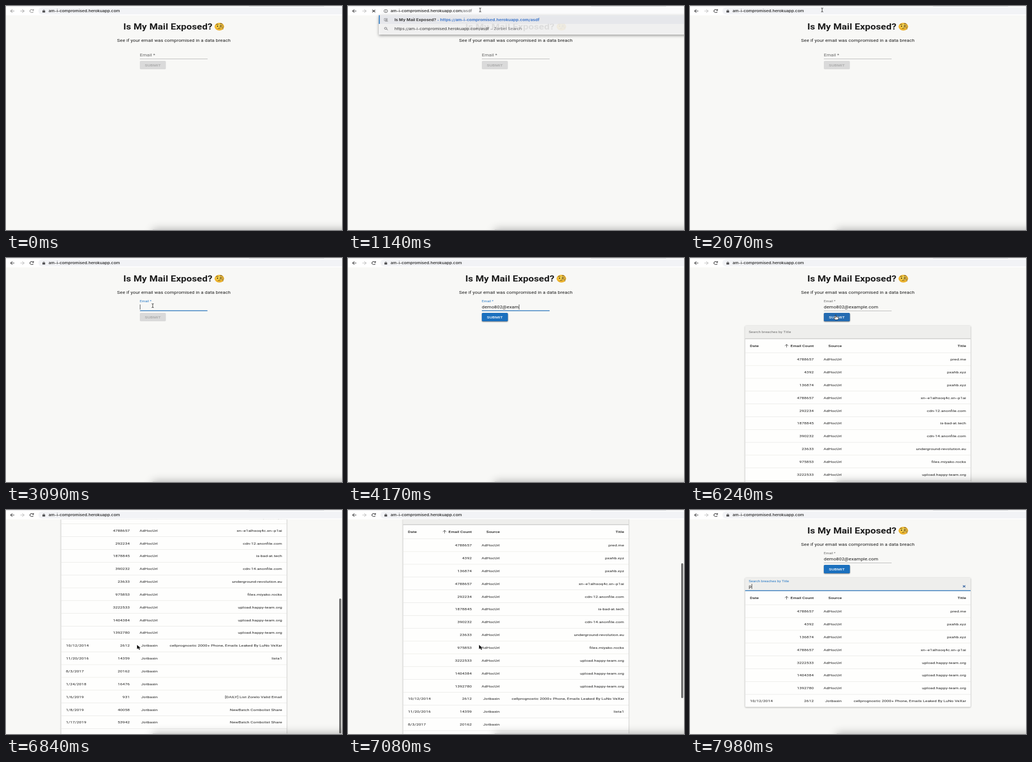
These frames come from a looping animation (600x400 px, 8000 ms). An HTML page with a canvas:

```html
<!DOCTYPE html>
<html lang="en">
<head>
<meta charset="utf-8">
<title>Breach check</title>
<style>
html, body { margin: 0; width: 100%; height: 100%; overflow: hidden; background: #f8f8f6; }
canvas { display: block; width: 600px; height: 400px; }
</style>
</head>
<body>
<canvas id="stage"></canvas>
<script>
const LOOP = 8000, W = 600, H = 400;
// The page is shown squashed: one page pixel is SX by SY on the stage.
const SX = 0.536, SY = 0.43;
const UI = 'Roboto, sans-serif', BAR = 'Inter, sans-serif';
const INK = '#1c1c1c', BLUE = '#1f74c4', PAGE = '#f8f8f6', PAPER = '#fefefd', LINE = '#e6e6e2';
const HOST = 'am-i-compromised.herokuapp.com', PATH = '/asdf';
const NAME = 'Is My Mail Exposed?', EMAIL = 'demo802@example.com';
const ROW = 22.85, TOP = 16.5;

const adHoc = (count, title) => ['', count, 'AdHocUrl', title];
const paste = (date, count, title) => [date, count, 'Jotbasin', title];
const ROWS = [
  adHoc('4788657', 'pred.me'),
  adHoc('4392', 'pxahb.xyz'),
  adHoc('136874', 'pxahb.xyz'),
  adHoc('4788657', 'xn--e1alhsoq4c.xn--p1ai'),
  adHoc('292234', 'cdn-12.anonfile.com'),
  adHoc('1878845', 'is-bad-at.tech'),
  adHoc('390232', 'cdn-14.anonfile.com'),
  adHoc('23633', 'underground-revolution.eu'),
  adHoc('975853', 'files.miyako.rocks'),
  adHoc('3222533', 'upload.happy-team.org'),
  adHoc('1404384', 'upload.happy-team.org'),
  adHoc('1392780', 'upload.happy-team.org'),
  paste('10/12/2014', '2612', 'cellprognostic 2000+ Phone, Emails Leaked By LuNo VeXar'),
  paste('11/20/2016', '14359', 'lista1'),
  paste('8/3/2017', '20162', ''),
  paste('1/24/2018', '16476', ''),
  paste('1/6/2019', '931', '[DAILY] List Zorelo Valid Email'),
  paste('1/8/2019', '40058', 'NewBatch Combolist Share'),
  paste('1/17/2019', '53942', 'NewBatch Combolist Share'),
  paste('2/3/2019', '15208', 'NewBatch Combolist Share')
];

const AT = {
  focus: 300, openList: 560, enter: 1100, loaded: 1600, home: 1650,
  email: 2900, type: 3260, select: 5200, submit: 5800, table: 6040,
  search: 7520, letter: 7890, filter: 7950
};
const MOUSE = [
  [60, 300, 0], [280, 236, 7], [2070, 236, 7], [2250, 241, 38],
  [2430, 241, 38], [2860, 262, 85], [5380, 262, 85], [5720, 261, 106],
  [6290, 261, 106], [6480, 235, 244], [7290, 235, 244], [7480, 180, 133]
];
const SCROLL = [[6490, 0], [6840, 213], [6900, 213], [7290, 0]];

const cv = document.getElementById('stage'), c = cv.getContext('2d');
const dpr = window.devicePixelRatio || 1;
cv.width = W * dpr;
cv.height = H * dpr;

const clamp = v => Math.max(0, Math.min(1, v));
const ease = v => v * v * (3 - 2 * v);
const ramp = (t, start, dur) => ease(clamp((t - start) / dur));
const mix = (a, b, k) => a + (b - a) * k;
const blink = (t, start) => (t - start) % 1060 < 530;

function follow(keys, t) {
  const n = keys.findIndex(k => k[0] > t);
  if (n < 0) return keys[keys.length - 1].slice(1);
  if (n === 0) return keys[0].slice(1);
  const a = keys[n - 1], b = keys[n], k = ease((t - a[0]) / (b[0] - a[0]));
  return a.slice(1).map((v, i) => mix(v, b[i + 1], k));
}

function box(x, y, w, h, color) {
  c.fillStyle = color;
  c.fillRect(x, y, w, h);
}

function rounded(x, y, w, h, r, color) {
  c.fillStyle = color;
  c.beginPath();
  c.roundRect(x, y, w, h, r);
  c.fill();
}

// Draws text vertically centred on its capitals; returns its stage width.
function text(str, x, y, o = {}) {
  const { size = 14, weight = 400, font = UI, color = INK, align = 'left' } = o;
  c.save();
  c.translate(x, y + size * 0.153);
  c.scale(SX, SY);
  c.font = `${weight} ${size}px ${font}`;
  c.letterSpacing = (o.spacing ?? (font === UI ? 0.15 : 0)) + 'px';
  c.textAlign = align;
  c.fillStyle = color;
  c.fillText(str, 0, 0);
  const w = c.measureText(str).width * SX;
  c.restore();
  return w;
}

// Runs a drawing in page pixels around a stage point.
function icon(x, y, color, width, draw) {
  c.save();
  c.translate(x, y);
  c.scale(SX, SY);
  c.strokeStyle = c.fillStyle = color;
  c.lineWidth = width;
  c.lineJoin = 'round';
  draw();
  c.restore();
}

function path(...pts) {
  c.beginPath();
  for (let i = 0; i < pts.length; i += 2) c.lineTo(pts[i], pts[i + 1]);
}
function stroke(...pts) { path(...pts); c.stroke(); }
function fill(...pts) { path(...pts); c.fill(); }
function ring(x, y, r, a = 0, b = 7) { c.beginPath(); c.arc(x, y, r, a, b); c.stroke(); }
function disc(x, y, rx, ry = rx) { c.beginPath(); c.ellipse(x, y, rx, ry, 0, 0, 7); c.fill(); }

function arrow(x, y, dir, color) {
  icon(x, y, color, 1.9, () => {
    stroke(-6.5 * dir, 0, 6.5 * dir, 0);
    stroke(0, -6.5, 6.5 * dir, 0, 0, 6.5);
  });
}

function cross(r) {
  stroke(-r, -r, r, r);
  stroke(-r, r, r, -r);
}

function toolbar(t) {
  const active = t >= AT.focus, dark = active ? '#2a2a2c' : '#8c8c8c';
  const editing = t >= AT.openList && t < AT.home;
  box(0, 0, W, TOP, '#fff');
  box(0, 0, W, 1, '#e4e4e6');
  box(434, 0, 134, 1, '#cbccd0');
  rounded(58, 2.5, 560, 12.5, 6, editing ? '#fbfbfc' : '#f2f3f6');
  arrow(11.5, 9, -1, dark);
  arrow(29, 9, 1, active ? '#b8b8b8' : '#a0a0a0');

  icon(46, 9, dark, 1.9, () => {
    if (t >= AT.enter && t < AT.loaded) {
      cross(5);
    } else {
      ring(0, 0, 6, 0.5, 5.6);
      fill(7, -8, 7, -1.5, 0.5, -1.5);
    }
  });

  icon(67.5, 9, '#48484a', 1.6, () => {
    if (editing) {
      ring(0, 0, 6.2);
      stroke(0, -0.8, 0, 3.6);
      c.fillRect(-0.9, -3.8, 1.8, 1.8);
    } else {
      c.fillRect(-4.5, -1.5, 9, 7.5);
      ring(0, -2, 2.8, Math.PI, 2 * Math.PI);
    }
  });

  if (t >= 360 && t < 530) box(76, 4, 127, 10, '#b5d3f5');
  const w = text(HOST, 76, 9, { font: BAR, weight: 500 });
  if (editing) {
    const n = Math.min(PATH.length, 1 + Math.floor((t - AT.openList) / 95));
    const v = text(PATH.slice(0, n), 76 + w, 9, { font: BAR, color: '#58585a' });
    if (t < AT.enter && blink(t, AT.openList)) box(76.5 + w + v, 4.5, 0.6, 9, INK);
  }
}

function suggestions(t) {
  if (t < AT.openList) return;
  const alpha = 1 - clamp((t - AT.enter) / 280);
  if (!alpha) return;
  const url = 'https://' + HOST + PATH;
  c.save();
  c.globalAlpha = alpha;
  c.shadowColor = 'rgba(0,0,0,.45)';
  c.shadowBlur = 5 * dpr;
  c.shadowOffsetY = 1.5 * dpr;
  box(55, TOP, 560, 34.5, '#fff');
  c.shadowColor = 'transparent';
  box(55, TOP, 560, 15.5, '#e5e6ea');
  box(55, TOP, 1.8, 15.5, BLUE);
  icon(68, 24.5, '#707074', 1.5, () => {
    c.strokeRect(-6, -5, 10, 9);
    stroke(-3, 6.5, 6.5, 6.5);
    disc(0, 0, 2.4);
  });
  const bold = { font: BAR, weight: 700 };
  const w = text(NAME + ' ', 83, 24.5, bold);
  text('- ' + url, 83 + w, 24.5, { ...bold, color: '#2263c4' });
  icon(68, 40.5, '#58585c', 1.8, () => { ring(-1.5, -1.5, 4); stroke(1.5, 1.5, 6, 6); });
  const v = text(url, 83, 40.5, { font: BAR, color: '#111' });
  text(' – Zorbel Search', 83 + v, 40.5, { font: BAR, color: '#5c5c60' });
  c.restore();
}

function face(x, y) {
  icon(x, y, '#f4c52e', 1.8, () => {
    const g = c.createRadialGradient(-2, -5, 2, 0, 0, 17);
    g.addColorStop(0, '#ffe45c');
    g.addColorStop(1, '#e9a61e');
    c.fillStyle = g;
    disc(0, 0, 16);
    c.strokeStyle = c.fillStyle = '#4a3010';
    disc(-6, -2, 2, 2.8);
    disc(5, -2, 2, 2.8);
    ring(-7, -5, 5, 3.8, 5.8);
    ring(6, -8, 5, 3.6, 5.8);
    ring(-1, 12, 5, 3.9, 5.5);
    c.strokeStyle = '#8b7a50';
    ring(6, -1, 6);
    stroke(12, 1, 12, 12);
  });
}

function emailField(t) {
  const up = ramp(t, AT.email, 200);
  const focused = t >= AT.email && t < AT.submit;
  text('Email *', 239, mix(87.5, 76.8, up), {
    size: mix(16, 12, up), color: focused ? BLUE : '#666'
  });
  box(239, 94, 121, 0.6, '#9c9c9c');
  if (focused) {
    const w = 121 * up;
    box(299.5 - w / 2, 93.5, w, 1.2, BLUE);
  }
  const n = clamp((t - AT.type) / 1480) * EMAIL.length;
  const shown = t < AT.type ? '' : EMAIL.slice(0, Math.floor(n) + 1);
  const selected = t >= AT.select && t < AT.submit;
  if (selected) box(239, 82.5, 89, 9.5, '#b4d2ee');
  const w = text(shown, 239, 87.3, { size: 16 });
  if (focused && !selected && blink(t, AT.email)) box(239.2 + w, 83, 0.7, 9, INK);
}

function button(t) {
  const on = clamp((t - AT.type) / 200), hover = t >= 5640 && t < 6330;
  const label = { weight: 500, spacing: 0.4, align: 'center' };
  rounded(239, 98, 46.5, 15, 1.8, '#dadada');
  text('SUBMIT', 262.3, 105.6, { ...label, color: '#a6a6a6' });
  if (!on) return;
  c.save();
  c.globalAlpha = on;
  c.shadowColor = 'rgba(0,0,0,.5)';
  c.shadowBlur = 2 * dpr;
  c.shadowOffsetY = dpr;
  rounded(239, 98, 46.5, 15, 1.8, hover ? '#1662ac' : '#1b70be');
  c.shadowColor = 'transparent';
  const k = clamp((t - AT.submit) / 550);
  if (k > 0 && k < 1) {
    c.save();
    c.clip();
    c.fillStyle = `rgba(255,255,255,${0.3 * (1 - k)})`;
    disc(261, 106, 30 * ease(k), 24 * ease(k));
    c.restore();
  }
  text('SUBMIT', 262.3, 105.6, { ...label, color: '#fff' });
  c.restore();
}

function table(t) {
  if (t < AT.table) return;
  const rows = t < AT.filter ? ROWS : ROWS.filter(r => r[3].includes('p'));
  const focused = t >= AT.search, up = ramp(t, AT.search, 200);
  c.save();
  c.shadowColor = 'rgba(0,0,0,.4)';
  c.shadowBlur = 2.5 * dpr;
  c.shadowOffsetY = 0.8 * dpr;
  rounded(98.5, 121, 402.5, 48 + ROW * rows.length, 1.5, PAPER);
  c.restore();

  rounded(98.5, 121, 402.5, 23.3, [1.5, 1.5, 0, 0], '#eeeeec');
  box(98.5, 143.8, 402.5, 0.6, '#949494');
  if (focused) {
    const w = 402.5 * up;
    box(299.75 - w / 2, 143.4, w, 1.2, BLUE);
  }
  text('Search breaches by Title', 105, mix(132.3, 127.3, up), {
    size: mix(12.6, 12, up), color: focused ? BLUE : '#6a6a6a'
  });
  if (focused) {
    const typed = t >= AT.letter;
    const w = typed ? text('p', 105, 136.5, { size: 16 }) : 0;
    if (blink(t, typed ? AT.letter : AT.search)) box(105.2 + w, 132, 0.7, 9, INK);
    if (typed) icon(489.5, 136.4, '#2a5a9c', 2.2, () => cross(4));
  }

  const right = { align: 'right' }, head = { weight: 500, align: 'right' };
  text('Date', 107, 157.2, { weight: 500 });
  icon(172.5, 157, '#444', 1.8, () => { stroke(0, 6, 0, -6); stroke(-5.5, -0.5, 0, -6, 5.5, -0.5); });
  text('Email Count', 221, 157.2, head);
  text('Source', 271, 157.2, head);
  text('Title', 493, 157.2, head);
  box(98.5, 168.8, 402.5, 0.7, LINE);
  rows.forEach(([date, count, source, title], i) => {
    const y = 181 + ROW * i;
    text(date, 107, y);
    text(count, 221, y, right);
    text(source, 271, y, right);
    text(title, 493, y, right);
    box(98.5, y + 10.7, 402.5, 0.7, LINE);
  });
}

function page(t) {
  const scroll = follow(SCROLL, t)[0];
  c.save();
  c.beginPath();
  c.rect(0, TOP, W, H);
  c.clip();
  box(0, 0, W, H, PAGE);
  c.translate(0, -scroll);
  text(NAME, 289, 36.8, { size: 32, weight: 700, align: 'center' });
  face(381, 36.8);
  text('See if your email was compromised in a data breach', 299.7, 61.6, { size: 16, align: 'center' });
  emailField(t);
  button(t);
  table(t);
  c.restore();

  const bar = clamp((t - 6500) / 60) * (1 - clamp((t - 7420) / 200));
  if (bar) {
    c.globalAlpha = bar;
    rounded(595, 17 + 141 * scroll / 213, 3.6, 241, 1.8, '#6c6c6c');
    c.globalAlpha = 1;
  }
}

// Soft shade along the bottom right edge.
function shade() {
  c.save();
  c.shadowColor = 'rgba(0,0,0,.3)';
  c.shadowBlur = 16 * dpr;
  box(262, 399, 380, 20, '#cfcfcf');
  c.restore();
}

function pointer(t) {
  if (t < 60 || (t > 3300 && t < 5380) || t > 7880) return;
  const [x, y] = follow(MOUSE, t);
  const inside = (l, u, r, d) => x > l && x < r && y > u && y < d;
  const scrolled = t > 6490 && t < 7290;
  const beam = inside(60, 2, 600, 15) || inside(239, 80, 360, 95) ||
    (t >= AT.table && !scrolled && inside(99, 121, 501, 144));
  icon(x, y, '#111', 1.6, () => {
    if (beam) {
      stroke(-3.5, -8, 0, -6.5, 3.5, -8);
      stroke(0, -6.5, 0, 7);
      stroke(-3.5, 8.5, 0, 7, 3.5, 8.5);
    } else if (inside(239, 98, 285, 113)) {
      c.fillStyle = '#fff';
      path(-3, -9, 0, -9, 0, -2, 8, 0, 8, 5, 5, 10, -3, 10, -8, 3, -6, 1, -3, 3);
      c.closePath();
      c.fill();
      c.stroke();
    } else {
      c.strokeStyle = '#fff';
      path(-2, -7, -2, 10, 2, 6.5, 5, 13, 8, 11.5, 5, 5.5, 10, 5.5);
      c.closePath();
      c.stroke();
      c.fill();
    }
  });
}

function frame(now) {
  const t = now % LOOP;
  c.setTransform(dpr, 0, 0, dpr, 0, 0);
  page(t);
  shade();
  toolbar(t);
  suggestions(t);
  pointer(t);
}

const start = performance.now();
function tick() {
  frame(performance.now() - start);
  requestAnimationFrame(tick);
}
tick();
</script>
</body>
</html>
```
